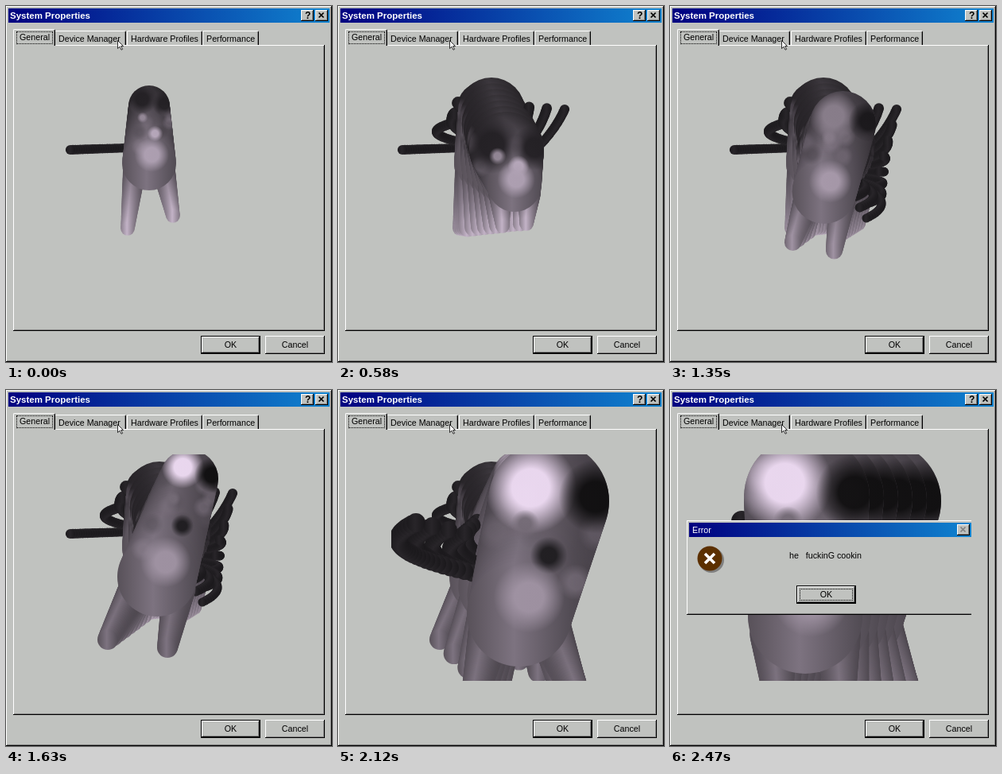
An HTML page with a canvas for the animation above (4.97 s loop, 410 by 448 pixels).

```html
<!DOCTYPE html>
<html lang="en">
<head>
<meta charset="utf-8">
<title>System Properties</title>
<style>
html, body { margin: 0; width: 100%; height: 100%; overflow: hidden; background: #c0c2bf; }
body { position: relative; font: 10.7px/13px "Liberation Sans", Arial, sans-serif; color: #000; }
div, span, canvas, svg { position: absolute; box-sizing: border-box; white-space: pre; }
.raised { background: #c0c2bf; box-shadow: inset -1px -1px #000, inset 1px 1px #fff, inset -2px -2px #808080; }
.bar { background: linear-gradient(90deg, #000080, #1084d0); color: #fff; }
.bar span { left: 4px; top: 3px; }
.bar b { position: absolute; left: 2px; top: 3px; font-size: 11.5px; }
.small { width: 16px; height: 14px; }
.small svg { left: 0; top: 0; }
.small b { position: absolute; left: 5px; top: 1px; font-size: 12px; }
.btn { width: 75px; height: 23px; line-height: 23px; text-align: center; }
.default { border: 1px solid #000; line-height: 21px; }
.tab { top: 31px; height: 18px; line-height: 18px; padding-left: 4px; border: solid; border-width: 1px 1px 0;
  border-color: #fff #000 #fff #fff; border-radius: 2px 2px 0 0; box-shadow: inset -1px 0 #808080; }
.focus { border: 1px dotted #000; }
</style>
</head>
<body>
<div class="raised" style="left:0;top:0;width:410px;height:448px"></div>
<div class="bar" style="left:3px;top:3px;width:404px;height:18px"><b>System Properties</b></div>
<div class="raised small" style="left:371px;top:5px"><b>?</b></div>
<div class="raised small" style="left:389px;top:5px"><svg width="16" height="14"><path d="M4.5 3.5l6 6m0-6l-6 6" stroke="#000" stroke-width="1.7"/></svg></div>

<div class="raised" style="left:9px;top:49px;width:392px;height:360px"></div>
<div class="tab" style="left:61px;width:90px">Device Manager</div>
<div class="tab" style="left:152px;width:95px">Hardware Profiles</div>
<div class="tab" style="left:247px;width:71px">Performance</div>
<div class="tab" style="left:9px;top:29px;width:53px;height:21px;padding-left:7px;background:#c0c2bf">General</div>
<div class="focus" style="left:13px;top:32px;width:46px;height:16px"></div>

<canvas id="stage" width="410" height="448" style="left:0;top:0"></canvas>
<svg width="14" height="20" style="left:139px;top:42px"><path d="M1.5 1.5v10l2.5-2.3 2 4 1.6-.8-2-3.9h3z" fill="#fff" stroke="#000" stroke-width=".8"/></svg>

<div class="raised btn default" style="left:245px;top:415px">OK</div>
<div class="raised btn" style="left:326px;top:415px">Cancel</div>

<div id="error" style="left:21px;top:164px;width:358px;height:119px;overflow:hidden;visibility:hidden">
  <div class="raised" style="left:0;top:0;width:360px;height:119px"></div>
  <div class="bar" style="left:3px;top:3px;width:355px;height:18px"><span>Error</span></div>
  <div class="raised small" style="left:340px;top:5px"><svg width="16" height="14"><path d="M4.5 3.5l6 6m0-6l-6 6" stroke="#808080" stroke-width="1.7"/></svg></div>
  <svg width="36" height="36" style="left:13px;top:32px">
    <circle cx="18" cy="18" r="16" fill="#808080"/>
    <circle cx="16" cy="16" r="15.5" fill="#5c3000"/>
    <path d="M10 10l12 12m0-12l-12 12" stroke="#fff" stroke-width="3.6"/>
  </svg>
  <span style="left:129px;top:38px">he   fuckinG cookin</span>
  <div class="raised btn default" style="left:138px;top:82px">OK</div>
  <div class="focus" style="left:142px;top:86px;width:67px;height:15px"></div>
</div>

<script>
const LOOP = 4970, FIRST = 20, STEP = 70, LAST = 35;
const ctx = document.getElementById('stage').getContext('2d');
const error = document.getElementById('error');

// head and hip: x, y, radius; feet: left x, y, right x, y; tail: tip x, y, sideways curl
const poses = [
  { step: -1, head: [180, 126, 26], hip: [180, 198, 34], feet: [153, 280, 210, 264], tail: [81, 181, 0] },
  { step: 0, head: [182, 128, 32], hip: [182, 198, 36], feet: [156, 280, 205, 270], tail: [142, 148, -70] },
  { step: 2, head: [193, 132, 42], hip: [192, 195, 44], feet: [163, 279, 190, 275], tail: [151, 122, 0] },
  { step: 8, head: [212, 180, 47], hip: [222, 225, 34], feet: [207, 277, 237, 274], tail: [285, 130, 15] },
  { step: 15, head: [205, 185, 46], hip: [198, 232, 31], feet: [181, 281, 210, 292], tail: [247, 267, 80] },
  { step: 23, head: [230, 112, 37], hip: [190, 235, 50], feet: [128, 314, 203, 324], tail: [180, 160, 0] },
  { step: 27, head: [258, 140, 65], hip: [240, 282, 55], feet: [200, 385, 302, 385], tail: [160, 180, -104] },
  { step: 30, head: [265, 140, 76], hip: [228, 282, 66], feet: [172, 385, 300, 385], tail: [98, 167, -145] },
  { step: LAST, head: [172, 135, 79], hip: [170, 285, 72], feet: [136, 385, 215, 385], tail: [90, 165, -30] },
];

// place across and along the body, size, shade seen from behind and from the front
const patches = [
  { u: -.35, v: -.12, size: .68, back: 35, front: 240 },
  { u: .75, v: -.04, size: .55, back: 35, front: 15 },
  { u: -.3, v: .2, size: .22, back: 150, front: 115 },
  { u: .25, v: .48, size: .3, back: 185, front: 30 },
  { u: .1, v: .85, size: .6, back: 175, front: 160 },
];

const mix = (a, b, k) => a + (b - a) * k;
const mixAll = (a, b, k) => a.map((v, i) => mix(v, b[i], k));
const tone = (v, alpha = 1) => `rgba(${v}, ${v * .92}, ${v * 1.02}, ${alpha})`;
const random = n => Math.abs(Math.sin(n * 78.233) * 43758.5453) % 1;

function poseAt(step) {
  const i = poses.findIndex(p => p.step >= step);
  const b = poses[i], a = poses[i - 1] || b;
  const k = (step - a.step) / (b.step - a.step || 1);
  return Object.fromEntries(['head', 'hip', 'feet', 'tail'].map(part => [part, mixAll(a[part], b[part], k)]));
}

// tapering tube from a to b, bent towards c; points are x, y, radius, shade
function tube(a, b, c = mixAll(a, b, .5)) {
  const path = new Path2D();
  for (let k = 0; k <= 1; k += 1 / 32) {
    const [x, y, r, shade] = mixAll(mixAll(a, c, k), mixAll(c, b, k), k);
    const fill = ctx.createLinearGradient(x - r, 0, x + r, 0);
    fill.addColorStop(0, tone(shade * .7));
    fill.addColorStop(.45, tone(shade));
    fill.addColorStop(1, tone(shade * .65));
    ctx.fillStyle = fill;
    const disc = new Path2D();
    disc.arc(x, y, r, 0, 7);
    ctx.fill(disc);
    path.addPath(disc);
  }
  return path;
}

function softSpot(x, y, r, shade, alpha) {
  const fill = ctx.createRadialGradient(x, y, r * .45, x, y, r * 1.1);
  fill.addColorStop(0, tone(shade, alpha));
  fill.addColorStop(1, tone(shade, 0));
  ctx.fillStyle = fill;
  ctx.fillRect(x - r * 1.2, y - r * 1.2, r * 2.4, r * 2.4);
}

function drawCat(step) {
  const { head, hip, feet, tail: [tipX, tipY, curl] } = poseAt(step);
  const [x, y, r] = hip;
  const facing = Math.min(1, Math.max(0, (step - 15) / 8));

  const root = [x, y - r * .6, r * .16, 40], tip = [tipX, tipY, r * .18, 40];
  const bend = mixAll(root, tip, .5);
  bend[0] += curl;
  tube(root, tip, bend);

  for (const side of [1, -1]) {
    const foot = side < 0 ? feet.slice(0, 2) : feet.slice(2);
    tube([x + side * r * .55, y + r * .3, r * .42, 115], [...foot, r * .26, mix(195, 125, facing)]);
  }

  const body = tube([...head, mix(55, 95, facing)], [...hip, 125]);
  const spot = (u, v, size, shade, alpha) => {
    const [sx, sy, sr] = mixAll(head, hip, v);
    softSpot(sx + u * sr, sy, size * sr, shade, alpha);
  };
  ctx.save();
  ctx.clip(body);
  // mottled fur that turns with the body
  for (let i = 1; i <= 16; i++) {
    const angle = random(i) * 6.28 + step * .25;
    if (Math.cos(angle) > 0) spot(Math.sin(angle), mix(-.2, 1.2, random(i + 40)), .3, mix(50, 150, random(i + 80)), .4);
  }
  for (const p of patches) spot(p.u, p.v, p.size, mix(p.back, p.front, facing), .95);
  ctx.restore();
}

let shown;
function frame() {
  const t = performance.now() % LOOP;
  const step = Math.min(LAST, Math.floor((t - FIRST) / STEP));
  if (step !== shown) {
    shown = step;
    ctx.clearRect(0, 0, 410, 448);
    ctx.save();
    ctx.beginPath();
    ctx.rect(67, 81, 275, 285);
    ctx.clip();
    // every pose stays behind as a trail
    for (let s = -1; s <= step; s++) drawCat(s);
    ctx.restore();
    error.style.visibility = step === LAST ? 'visible' : 'hidden';
  }
  requestAnimationFrame(frame);
}
frame();
</script>
</body>
</html>
```
